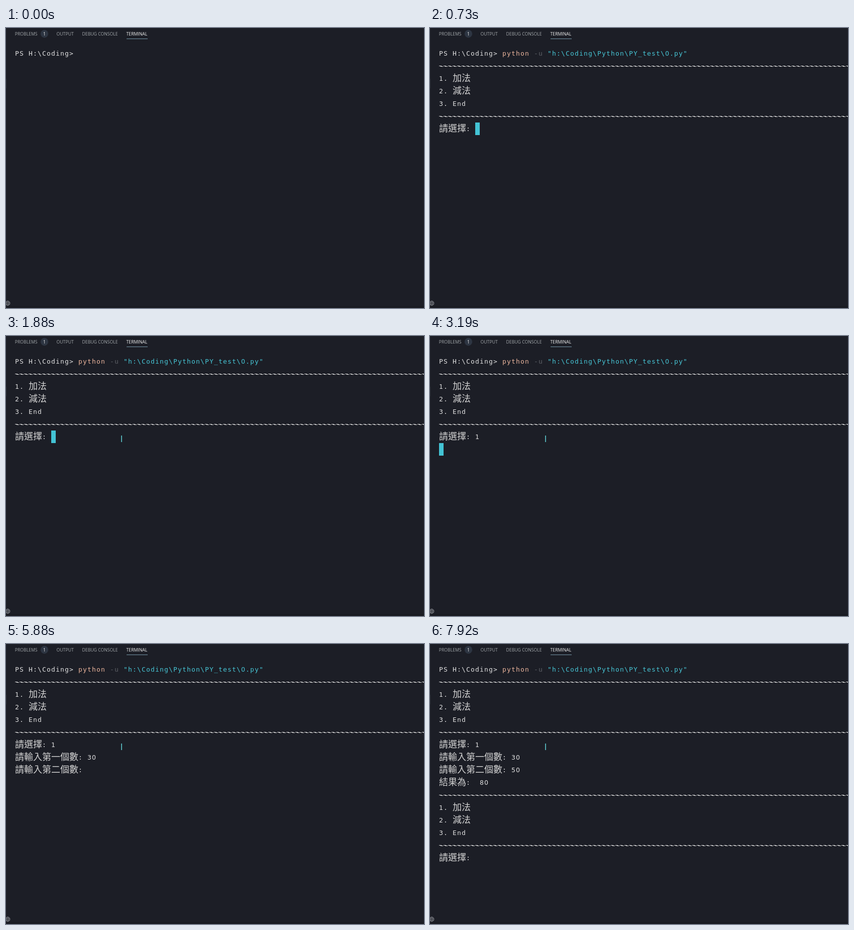
An HTML page that plays this animation: 832x557 px, repeating every 8 s.

```html
<!DOCTYPE html>
<html lang="zh-Hant">
<head>
<meta charset="utf-8">
<title>Terminal</title>
<style>
html, body { margin: 0; width: 832px; height: 557px; overflow: hidden; background: #1c1e26; }
svg { display: block; }
rect { shape-rendering: crispEdges; }
.tab { font: 8.7px "Open Sans", "Noto Sans", sans-serif; fill: #a3a8ab; }
.active { fill: #f4f4f4; }
.mono { font: 13px "DejaVu Sans Mono", monospace; }
.digit { font: 12.5px "DejaVu Sans", sans-serif; }
.cjk { font: 18px "Noto Sans CJK TC", "Noto Sans CJK", sans-serif; }
</style>
</head>
<body>
<svg id="stage" width="832" height="557" viewBox="0 0 832 557">
  <defs>
    <pattern id="dashes" x="18" y="0" width="9" height="25" patternUnits="userSpaceOnUse">
      <path d="M0 0h5v1h-5zM3 1h5v1h-5z" fill="#dcdcdc" shape-rendering="crispEdges"/>
    </pattern>
  </defs>
  <rect width="832" height="557" fill="#1c1e26"/>
  <rect y="553" width="832" height="4" fill="#191b22"/>
  <rect y="101" width="1" height="19" fill="#292c34"/>

  <text class="tab" x="17.7" y="15">PROBLEMS</text>
  <circle cx="76.5" cy="11.5" r="7.7" fill="#2d3542"/>
  <text class="tab active" x="76.5" y="15" text-anchor="middle">1</text>
  <text class="tab" x="100.5" y="15">OUTPUT</text>
  <text class="tab" x="151.5" y="15">DEBUG CONSOLE</text>
  <text class="tab active" x="239.5" y="15">TERMINAL</text>
  <rect x="240" y="21" width="42" height="1" fill="#7698a8"/>

  <g fill="none" stroke="#8b8e93" stroke-width="0.9">
    <circle cx="3.5" cy="547.5" r="4.4"/>
    <ellipse cx="3.5" cy="547.5" rx="1.9" ry="4.4"/>
    <path d="M-1 546h9M-1 549h9"/>
  </g>

  <g id="screen"></g>
  <rect id="cursor" width="9" height="25" fill="#43c3d4"/>
  <rect id="pointer" width="2" height="13" fill="#51a9af"/>
</svg>
<script>
const LOOP = 8000, CELL = 9, ROW = 25, LEFT = 18, TOP = 38;
const WHITE = "#e2e2e2", CYAN = "#47c6d6";
const NS = "http://www.w3.org/2000/svg";
const byId = id => document.getElementById(id);
const screen = byId("screen"), cursor = byId("cursor"), pointer = byId("pointer");
const items = [];

function add(start, tag, attrs, text = "") {
  const el = document.createElementNS(NS, tag);
  for (const key in attrs) el.setAttribute(key, attrs[key]);
  el.textContent = text;
  screen.append(el);
  items.push({ start, el });
}

const isCjk = ch => ch >= "\u4e00";
const cells = text => [...text].reduce((n, ch) => n + (isCjk(ch) ? 2 : 1), 0);

// Puts every character on the terminal grid.
function write(start, row, col, text, fill = WHITE) {
  for (const run of text.matchAll(/[\u4e00-\u9fff]+|\d+|[!-\/:-~]+/g)) {
    const [part] = run;
    const wide = isCjk(part[0]);
    const first = col + cells(text.slice(0, run.index));
    const x = [...part].map((_, i) => LEFT + CELL * (first + i * (wide ? 2 : 1)));
    add(start, "text", {
      x: x.join(" "),
      y: TOP + ROW * row + (wide ? 18 : 17),
      class: wide ? "cjk" : /\d/.test(part) ? "digit" : "mono",
      fill: wide ? "#d2d2d2" : fill
    }, part);
  }
}

function rule(start, row) {
  const y = TOP + ROW * row + 12;
  add(start, "rect", { x: LEFT, y, width: 832 - LEFT, height: 2, fill: "url(#dashes)" });
}

function menu(start, row) {
  rule(start, row);
  write(start, row + 1, 0, "1. 加法");
  write(start, row + 2, 0, "2. 減法");
  write(start, row + 3, 0, "3. End");
  rule(start, row + 4);
  write(start, row + 5, 0, "請選擇: ");
}

write(0, 0, 0, "PS H:\\Coding>");
write(550, 0, 14, "python", "#eab49c");
write(550, 0, 21, "-u", "#5d6066");
write(550, 0, 24, '"h:\\Coding\\Python\\PY_test\\0.py"', CYAN);
menu(730, 1);
write(2640, 6, 8, "1");
write(3240, 7, 0, "請輸入第一個數: ");
write(4770, 7, 16, "3");
write(4900, 7, 17, "0");
write(5280, 8, 0, "請輸入第二個數: ");
write(6720, 8, 16, "5");
write(6900, 8, 17, "0");
write(7330, 9, 0, "結果為:  80");
menu(7330, 10);

// Time, column, row; a lone time hides the cursor.
const cursorSteps = [
  [0], [320, 14, 0], [550], [640, 0, 1], [730, 8, 6], [1310], [1880, 8, 6],
  [2490], [2640, 9, 6], [3190, 0, 7], [3240, 16, 7], [3830], [4390, 16, 7],
  [4770, 17, 7], [4900, 18, 7], [5230, 0, 8], [5280, 16, 8], [5880],
  [6440, 16, 8], [6720, 17, 8], [6900, 18, 8], [7330, 8, 15], [7920]
];

const show = (el, on) => el.setAttribute("visibility", on ? "visible" : "hidden");

function place(el, x, y) {
  el.setAttribute("x", x);
  el.setAttribute("y", y);
}

function movePointer(t) {
  show(pointer, t >= 1140);
  const step = Math.min(11, Math.max(0, Math.floor((t - 1140) / 60)));
  const ease = 1 - (1 - step / 11) ** 2;
  place(pointer, Math.round(430 - 201 * ease), Math.round(28 + 170 * ease));
}

function draw(t) {
  for (const { start, el } of items) show(el, t >= start);
  const [, col, row] = cursorSteps.findLast(step => step[0] <= t);
  show(cursor, col !== undefined);
  if (col !== undefined) place(cursor, LEFT + CELL * col, TOP + ROW * row);
  movePointer(t);
}

const begin = performance.now();
function tick() {
  draw(Math.max(0, performance.now() - begin) % LOOP);
  requestAnimationFrame(tick);
}
tick();
</script>
</body>
</html>
```
